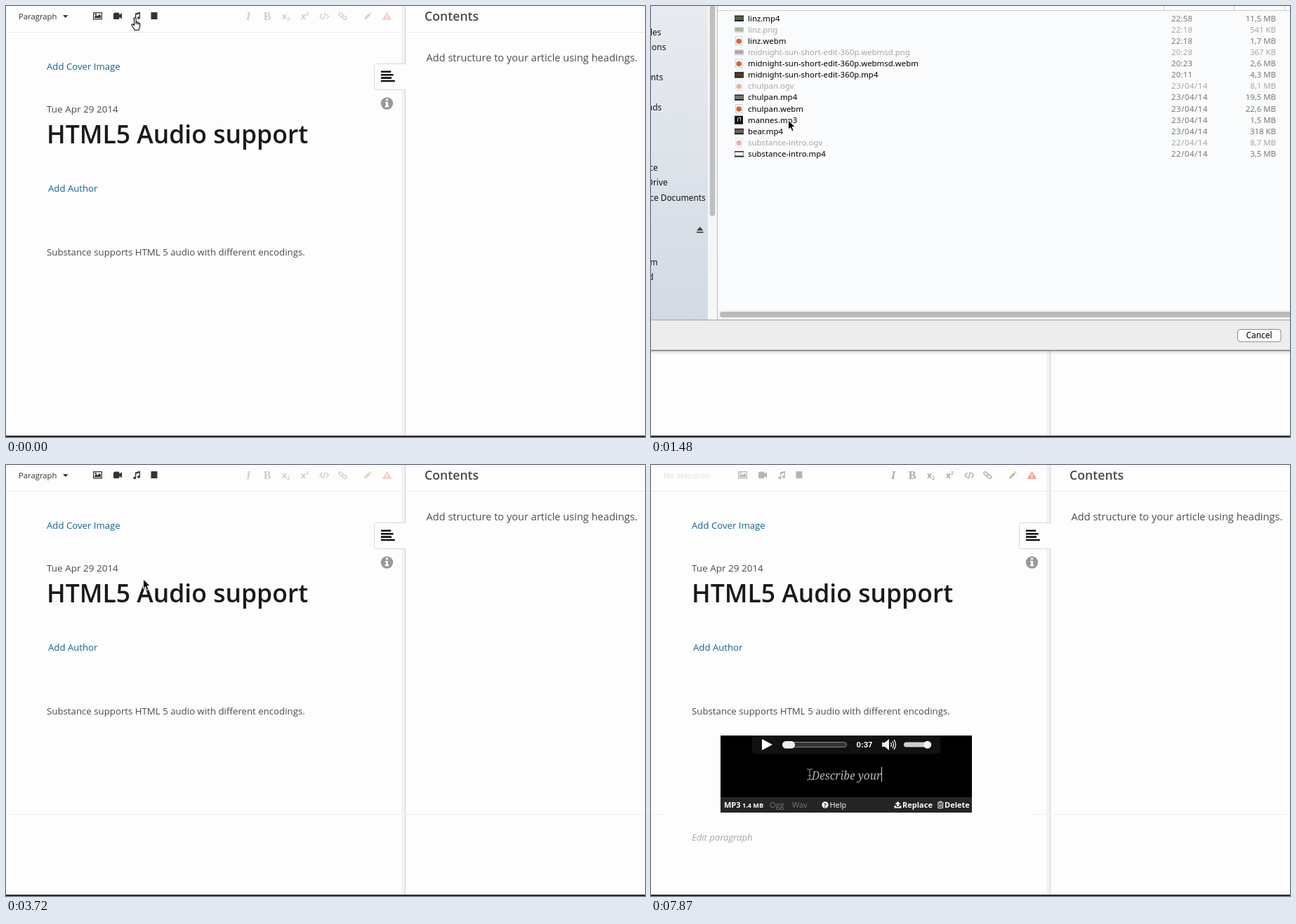
Write an HTML page that moves like this. It is 910 px wide and 615 px high and loops after 8 s.

```html
<!DOCTYPE html>
<html lang="en">
<head>
<meta charset="utf-8">
<title>Audio support</title>
<style>
html, body { margin: 0; width: 100%; height: 100%; overflow: hidden; background: #fdfdfd; }
svg { display: block; width: 910px; height: 615px; }
text { font-family: "Open Sans", sans-serif; white-space: pre; }
#sheet text { font-family: "Noto Sans", "Open Sans", sans-serif; font-size: 11.4px; }
#sheet .big { font-size: 11.9px; }
.serif { font: bold 16px "Liberation Serif", serif; }
.slant { font-style: italic; }
.link { fill: #12648a; font-size: 13.2px; }
.bar text { font-size: 11px; fill: #fff; }
.bar .b { font-weight: 700; }
.bar .off { fill: #777; }
#caption { font: italic 15.5px "Noto Serif", serif; fill: #b4b4b4; }
</style>
</head>
<body>
<svg viewBox="0 0 910 615" xmlns="http://www.w3.org/2000/svg">
  <defs>
    <linearGradient id="side" x2="0" y2="1">
      <stop stop-color="#e9edf1"/><stop offset="1" stop-color="#d3dae4"/>
    </linearGradient>
    <linearGradient id="sideGrey" x2="0" y2="1">
      <stop offset=".39" stop-color="#f1f1f2"/><stop offset=".39" stop-color="#e5e6e7"/>
      <stop offset=".745" stop-color="#e5e6e7"/><stop offset=".745" stop-color="#dadadb"/>
      <stop offset=".95" stop-color="#dadadb"/><stop offset=".95" stop-color="#e6e7e8"/>
    </linearGradient>
  </defs>
  <rect width="910" height="615" fill="#fdfdfd"/>
  <rect x="563" width="5" height="613" fill="#f3f3f3"/>
  <path d="M568.5 0V613" stroke="#d2d2d2"/>
  <path d="M0 37.5H563M570 37.5H910" stroke="#ebebeb"/>

  <g id="tools" fill="#333">
    <text id="mode" x="18" y="19" font-size="11.3">Paragraph</text>
    <path id="drop" d="M81 13h7.4l-3.7 4z"/>
    <path fill-rule="evenodd" d="M124 9h13v10.500h-13zM125.200 10.200v8h10.600v-8zM126.200 17.300v-2l2.300-2.300 1.700 1.700 3-3 1.800 2v3.600zM126.500 12a1.200 1.200 0 1 0 2.400 0a1.200 1.200 0 1 0-2.400 0z"/>
    <path d="M154.500 9.500h5.500q1.500 0 1.500 1.500v1.700l3.500-2.700v8.500l-3.500-2.700v1.700q0 1.500-1.500 1.500h-5.500q-1.500 0-1.500-1.500v-6q0-1.500 1.500-1.500z"/>
    <path d="M184 10.500l7-2v8.500a2 1.700 0 1 1-1.300-1.600v-4.200l-4.400 1.300v6a2 1.700 0 1 1-1.300-1.600z"/>
    <rect x="206.500" y="9" width="9" height="10"/>
  </g>
  <g id="format" fill="#cfcfcf">
    <text class="serif slant" x="345" y="20" text-anchor="middle">I</text>
    <text class="serif" x="372" y="20" text-anchor="middle">B</text>
    <text x="393" y="19" font-size="12" font-weight="700">x<tspan font-size="7" dy="2">2</tspan></text>
    <text x="420" y="19" font-size="12" font-weight="700">x<tspan font-size="7" dy="-5">2</tspan></text>
    <g id="strokes" fill="none" stroke="#cfcfcf" stroke-width="1.400">
      <path d="M450.500 11l-3.500 3.700 3.500 3.700M456 11l3.500 3.700-3.500 3.700M454.500 10l-2.500 9.500"/>
      <rect x="474" y="10.500" width="6.500" height="4" rx="2" transform="rotate(40 477 12)"/>
      <rect x="479" y="14.500" width="6.500" height="4" rx="2" transform="rotate(40 482 16)"/>
    </g>
    <path id="pencil" d="M510 19.500l.6-3 6-6 2.400 2.400-6 6zM517.300 9.800l1-1 2.400 2.400-1 1z"/>
    <path id="warn" fill-rule="evenodd" d="M542.500 8.500l6.800 11.500h-13.600zM541.600 12.500l.3 4h1.200l.3-4zM541.700 17.300v1.400h1.600v-1.400z"/>
  </g>

  <text class="link" x="58" y="91">Add Cover Image</text>
  <text x="58" y="152" font-size="13.5" fill="#4a4a4a">Tue Apr 29 2014</text>
  <text x="58" y="196" font-size="35.5" font-weight="600" fill="#1a1a1a">HTML5 Audio support</text>
  <text class="link" x="60" y="265">Add Author</text>
  <text x="58" y="356" font-size="13.25" fill="#4a4a4a">Substance supports HTML 5 audio with different encodings.</text>

  <text x="596" y="21" font-size="17.7" font-weight="600" fill="#4a4a4a">Contents</text>
  <text x="598.500" y="78.500" font-size="14.6" fill="#4f4f4f">Add structure to your article using headings.</text>
  <path d="M569 82.500H527.500q-3 0-3 3v31q0 3 3 3H569" fill="#fdfdfd" stroke="#d8d8d8"/>
  <path d="M534 93.700h14.300M534 98.200h17.600M534 102.600h15M534 107h19.800" stroke="#111" stroke-width="2.600"/>
  <circle cx="542.500" cy="139" r="8.700" fill="#999"/>
  <path d="M541 132.500h3v2.600h-3zM540 136.800h4v5.400h1.300v2h-5.600v-2h1.300v-3.400h-1z" fill="#fff"/>

  <path id="seam" stroke="#f1f1f1" stroke-width="1.500"/>

  <g id="audio">
    <rect x="99" y="386" width="358" height="110"/>
    <path d="M144 386h268v21q0 5-5 5h-258q-5 0-5-5z" fill="#111"/>
    <path d="M158 391l15 8-15 8z" fill="#fff"/>
    <rect x="187.500" y="395.500" width="91" height="7" rx="3.500" fill="#333" stroke="#888"/>
    <rect x="187" y="394" width="18" height="10.500" rx="5.200" fill="#eee"/>
    <text x="292.500" y="403" fill="#fff" style="font:bold 11.500px 'Liberation Sans',sans-serif">0:37</text>
    <path d="M329 396h4l6-5v16l-6-5h-4z" fill="#eee"/>
    <path d="M341.500 396q2 3 0 6M343.800 394q3.400 5 0 10M346 392q5 7 0 14" fill="none" stroke="#eee" stroke-width="1.300"/>
    <rect x="360" y="395.500" width="37" height="7" rx="3.500" fill="#ccc"/>
    <circle cx="393.700" cy="399.200" r="5.500" fill="#f4f4f4"/>
    <g class="bar">
      <rect x="99" y="474" width="358" height="22" fill="#252525"/>
      <text class="b" x="104" y="489">MP3</text>
      <text class="b" x="130" y="489" style="font-size:9.100px">1.4 MB</text>
      <text class="off" x="169" y="489">Ogg</text>
      <text class="off" x="201" y="489">Wav</text>
      <circle cx="248" cy="485" r="4.700" fill="#fff"/>
      <text class="b" x="248" y="488.500" text-anchor="middle" style="font-size:8.500px;fill:#252525">?</text>
      <text x="254.500" y="489">Help</text>
      <path d="M351.500 480l4 4h-2.500v3h-3v-3h-2.500zM346.500 486h2.500v2h5v-2h2.500v3.500h-10z" fill="#fff"/>
      <text class="b" x="358" y="489">Replace</text>
      <path d="M408 482h8.500M410.500 481.500v-1.200h3.500v1.200M409 482.500v7h6.500v-7M411.300 484v4M413.300 484v4" fill="none" stroke="#fff"/>
      <text class="b" x="418" y="489">Delete</text>
    </g>
    <text class="slant" x="58" y="536" font-size="13.1" fill="#a6a6a6">Edit paragraph</text>
  </g>
  <text id="caption" x="278.500" y="448.500"></text>
  <path id="caret" d="M.5 431V452" stroke="#ccc"/>
  <path id="paraCaret" d="M58.500 518V540" stroke="#333"/>

  <g id="sheet"></g>

  <g id="hand" fill="#fff" stroke="#111" stroke-width="1.100" stroke-linejoin="round">
    <path d="M182.500 26v-8q0-1.700 1.300-1.700t1.300 1.700v5q1.600-.7 2.200.6 1.500-.6 2 .7 1.400-.2 1.400 1.400v3.300l-1.400 4v1.500h-6.500v-1.500l-3.600-5q-.9-1.800.5-2.100 1.300-.1 2.800 2z"/>
    <path d="M185.100 23v3M187.300 23.600v2.600M189.300 24.300v2.200"/>
  </g>
  <path id="arrow" d="M0 0v13.500l3.100-2.900 2.200 5 2.400-1-2.200-4.900h4.400z" fill="#000" stroke="#fff"/>
  <path id="beam" d="M-4-7.500h2.500l1.500 1.500 1.500-1.500h2.500M-4 7.500h2.500l1.500-1.500 1.500 1.500h2.500M0-6V6M-2 1.500h4" fill="none" stroke="#777" stroke-width="1.300"/>
  <rect y="613" width="910" height="2" fill="#2a2a2a"/>
</svg>
<script>
const $ = id => document.getElementById(id);
const sheet = $('sheet');
const LOOP = 8000, MID = 442, BASE = 491.5;
const warped = [];   // redraw functions, each taking the current warp

function add(tag, attrs, parent = sheet, text) {
  const e = document.createElementNS('http://www.w3.org/2000/svg', tag);
  for (const k in attrs) e.setAttribute(k, attrs[k]);
  if (text) e.textContent = text;
  parent.appendChild(e);
  return e;
}

// The sheet narrows with the square of the distance above its lower edge
// and, while opening, stretches with the cube of it.
function warpOf({ bottom, k, wide, stretch }) {
  const at = y => {
    const d = BASE - y, rise = d + stretch * d ** 3, v = 1 + 3 * stretch * d * d;
    return { y: bottom - rise, s: wide - k * rise * rise, slope: 2 * k * rise * v, v };
  };
  return {
    point(x, y) {
      const p = at(y);
      return (MID + (x - MID) * p.s).toFixed(2) + ' ' + p.y.toFixed(2);
    },
    matrix(x, y) {
      const p = at(y), skew = (x - MID) * p.slope;
      return `matrix(${p.s} 0 ${skew} ${p.v} ${MID + (x - MID) * p.s - p.s * x - skew * y} ${p.y - p.v * y})`;
    }
  };
}

function track(pts, attrs, closed) {
  const e = add('path', attrs);
  warped.push(w => e.setAttribute('d', 'M' + pts.map(p => w.point(...p)).join('L') + (closed ? 'Z' : '')));
  return e;
}
function edge(x0, y0, x1, y1) {
  const n = y0 === y1 ? 1 : 16;
  return Array.from({ length: n + 1 }, (_, i) => [x0 + (x1 - x0) * i / n, y0 + (y1 - y0) * i / n]);
}
const band = (x0, y0, x1, y1, fill) => track([...edge(x0, y0, x0, y1), ...edge(x1, y1, x1, y0)], { fill }, true);
const line = (x0, y0, x1, y1, stroke, width = 1, cap = 'butt') =>
  track(edge(x0, y0, x1, y1), { stroke, 'stroke-width': width, 'stroke-linecap': cap, fill: 'none' });
function item(x, y) {
  const g = add('g', {});
  warped.push(w => g.setAttribute('transform', w.matrix(x, y)));
  return g;
}
function label(x, y, str, attrs = {}, mid = x + str.length * 3) {
  return add('text', { x, y: y + 4, ...attrs }, item(mid, y), str);
}

const L = -200, R = 1150;
const shadow = [5, 3, 1].map(h => {
  const e = band(L, 480, R, BASE + h, '#000');
  e.setAttribute('fill-opacity', .05);
  return e;
});
const side = band(L, -40, 81, 448, 'url(#side)');
band(81, -40, 94, 448, '#f6f6f7');
const list = band(94, -40, R, 448, '#f9fbfd');
const stripes = [];
for (let i = 0; i < 7; i++) stripes.push(band(95, 235 + i * 32.2, R, 251 + i * 32.2, '#e9ecef'));
stripes.push(band(96, 323, 460, 385, '#e6e7e7'));
line(94.5, -40, 94.5, 448, '#bcbcbc');
line(95, 6.5, R, 6.5, '#cfcfcf');
for (const x of [730.5, 830.5, 902.5]) line(x, -40, x, 6, '#d0d0d0');
line(87.5, -40, 87.5, 296, '#bfbfbf', 7.5, 'round');
band(95, 434, R, 448, '#f4f4f4');
line(102, 440.2, R, 440.2, '#b9b9b9', 8, 'round');

const place = { fill: '#111', class: 'big' };
['Stowlet', 'All My Files', 'Applications', 'Desktop', 'Documents', 'Torvick', 'Downloads', 'Movies',
 'Music', 'Pictures', 'substance', 'Mobile Drive', 'Substance Documents'].forEach((name, i) => {
  const y = 16.5 + i * 21.45;
  label(-47, y, name, place);
  add('rect', { x: -62, y: y - 5, width: 11, height: 11, fill: '#808080' }, item(-56, y));
});
label(-49, 365.5, 'Filesystem', place);
label(-45, 387, 'Archived', place);
add('path', { d: 'M65 320.500l4.700-5.500 4.700 5.500zM65 322h9.400v1.700h-9.400z', fill: '#444' }, item(70, 319));

const SUN = 'midnight-sun-short-edit-360p', DAY = '23/04/14', EVE = '22/04/14';
const files = [
  ['linz.mp4', '22:58', '11,5 MB', '#55613a'], ['linz.png', '22:18', '541 KB', '#a9b7a0'],
  ['linz.webm', '22:18', '1,7 MB'], [SUN + '.webmsd.png', '20:28', '367 KB', '#b9a0b8'],
  [SUN + '.webmsd.webm', '20:23', '2,6 MB'], [SUN + '.mp4', '20:11', '4,3 MB', '#5a3a20'],
  ['chulpan.ogv', DAY, '8,1 MB'], ['chulpan.mp4', DAY, '19,5 MB', '#777'],
  ['chulpan.webm', DAY, '22,6 MB'], ['mannes.mp3', DAY, '1,5 MB'],
  ['bear.mp4', DAY, '318 KB', '#6b625c'], ['substance-intro.ogv', EVE, '8,7 MB'],
  ['substance-intro.mp4', EVE, '3,5 MB', '#fff']
];
const kinds = { mp4: 'M…vie', png: 'PNG', webm: 'H…M)', ogv: 'H…gg)', mp3: 'M…io' };
const PICK = 9, rowY = i => 17.5 + i * 16.13;
const glow = line(104, rowY(PICK), R, rowY(PICK), '#3672d9', 16, 'round');
const picked = [];

function fileIcon(ext, y, tone) {
  const g = item(125, y);
  if (ext === 'mp3') {
    add('rect', { x: 119, y: y - 6, width: 12, height: 12, fill: '#111' }, g);
    add('path', { d: `M123.500 ${y + 2.5}v-5l4-1v5`, stroke: '#ddd', fill: 'none' }, g);
  } else if (tone) {
    add('rect', { x: 119, y: y - 4, width: 13, height: 8.5, fill: ext === 'png' ? '#d8d8d8' : '#222' }, g);
    add('rect', { x: 119.5, y: y - 2.5, width: 12, height: 5, fill: tone }, g);
  } else {
    add('rect', { x: 120.5, y: y - 6, width: 9.5, height: 12, fill: '#fff', stroke: '#bbb', 'stroke-width': .7 }, g);
    add('circle', { cx: 125.2, cy: y + .5, r: 3.8, fill: '#d0693a' }, g);
  }
  if (ext === 'ogv') g.setAttribute('opacity', .45);
}

files.forEach(([name, date, size, tone], i) => {
  const y = rowY(i), ext = name.split('.').pop(), dim = ext === 'png' || ext === 'ogv';
  const soft = { fill: dim ? '#a6a6a6' : '#777' };
  fileIcon(ext, y, tone);
  const cells = [
    label(138, y, name, { fill: dim ? '#a6a6a6' : '#000' }),
    label(741, y, date, { ...soft, 'letter-spacing': date.includes('/') ? .55 : .2 }),
    label(890, y, size, { ...soft, 'text-anchor': 'end' }, 869),
    label(914, y, kinds[ext], soft)
  ];
  if (i === PICK) cells.forEach(c => picked.push([c, c.getAttribute('fill')]));
});

const foot = band(L, 448, R, BASE, '#ededed');
line(L, 448, R, 448, '#999');
line(L, BASE, R, BASE, '#777', 1.3);
[[835.5, 'Cancel'], [911, 'Open']].forEach(([x, name]) => {
  add('rect', { x, y: 461.5, width: 61.5, height: 17.5, rx: 3.5, fill: '#fbfbfb', stroke: '#8a8a8a' }, item(x + 31, 470));
  label(x + 30.5, 470, name, { 'text-anchor': 'middle', class: 'big' }, x + 31);
});

const far = { k: 6e-7, wide: 1.01, stretch: 1.26e-7 };
const poses = [
  [0, null],
  [440, { ...far, bottom: 150 }],
  [590, { ...far, k: 5.84e-7, bottom: 391.3 }],
  [740, { k: 0, wide: 1, stretch: 0, bottom: BASE }],
  [3430, { k: 5.3e-7, wide: 1, stretch: 0, bottom: 488.8 }],
  [3580, { ...far, bottom: 250 }],
  [3720, null]
];
const typed = [[0, 0], [6390, 2], [6540, 4], [6840, 5], [6990, 6], [7130, 7], [7280, 8], [7430, 9], [7580, 10], [7720, 11], [7870, 13]];
const within = (t, a, b) => t >= a && t < b;
const latest = (keys, t) => keys.filter(k => k[0] <= t).pop()[1];
const show = (e, on) => e.setAttribute('visibility', on ? 'visible' : 'hidden');
const hops = (t, from, n) => Math.max(0, Math.min(n, Math.floor((t - from) / 147.5) + 1)) / n;
const smooth = p => p * p * (3 - 2 * p);
let lastPose;

function drawSheet(t) {
  const pose = latest(poses, t), opening = t < 740, chosen = t >= 2680;
  sheet.style.display = pose ? '' : 'none';
  if (pose && pose !== lastPose) {
    const w = warpOf(pose);
    warped.forEach(f => f(w));
  }
  lastPose = pose;
  side.setAttribute('fill', opening ? 'url(#sideGrey)' : 'url(#side)');
  list.setAttribute('fill', opening ? '#f4f5f5' : '#f9fbfd');
  foot.setAttribute('fill', opening ? '#e5e6e7' : '#ededed');
  foot.setAttribute('fill-opacity', opening ? .9 : 1);
  shadow.forEach(e => show(e, !opening));
  stripes.forEach(e => show(e, opening));
  show(glow, chosen);
  picked.forEach(([e, fill]) => e.setAttribute('fill', chosen ? '#fff' : fill));
}

function drawPage(t) {
  const added = t >= 3870, idle = t >= 5650;
  $('mode').textContent = idle ? 'No selection' : 'Paragraph';
  $('mode').setAttribute('fill', idle ? '#dedede' : '#333');
  $('tools').setAttribute('fill', idle ? '#b5b5b5' : '#333');
  show($('drop'), !idle);
  const tone = added ? '#acacac' : '#cfcfcf';
  $('format').setAttribute('fill', tone);
  $('strokes').setAttribute('stroke', tone);
  $('pencil').setAttribute('fill', added ? '#bfc39a' : '#d6d9be');
  $('warn').setAttribute('fill', added ? '#efa79b' : '#f7cec7');
  show($('audio'), added);
  show($('seam'), t >= 3580);
  $('seam').setAttribute('d', added ? 'M0 498.500H18M542 498.500H910' : 'M0 498.500H910');
  show($('paraCaret'), within(t, 4020, 4460) || within(t, 4900, 5350));

  const cap = $('caption');
  cap.textContent = 'Describe your'.slice(0, latest(typed, t));
  const w = cap.textContent ? cap.getComputedTextLength() : 0;
  cap.setAttribute('x', 278.5 - w / 2);
  $('caret').setAttribute('transform', `translate(${Math.round(278 + w / 2)} 0)`);
  show($('caret'), within(t, 5790, 6090) || t >= 6390);
}

function drawPointer(t) {
  const a = smooth(hops(t, 880, 5)), b = smooth(hops(t, 4310, 5));
  const x = 184 + 11.5 * a + 30.5 * b, y = 18 + 145 * a + 278.5 * b;
  const overText = y > 412;
  show($('hand'), t < 740);
  show($('arrow'), t >= 740 && !overText);
  show($('beam'), overText);
  for (const id of ['arrow', 'beam']) $(id).setAttribute('transform', `translate(${x} ${y})`);
}

const start = performance.now();
function frame() {
  const t = (performance.now() - start) % LOOP;
  drawPage(t);
  drawSheet(t);
  drawPointer(t);
  requestAnimationFrame(frame);
}
frame();
</script>
</body>
</html>
```
